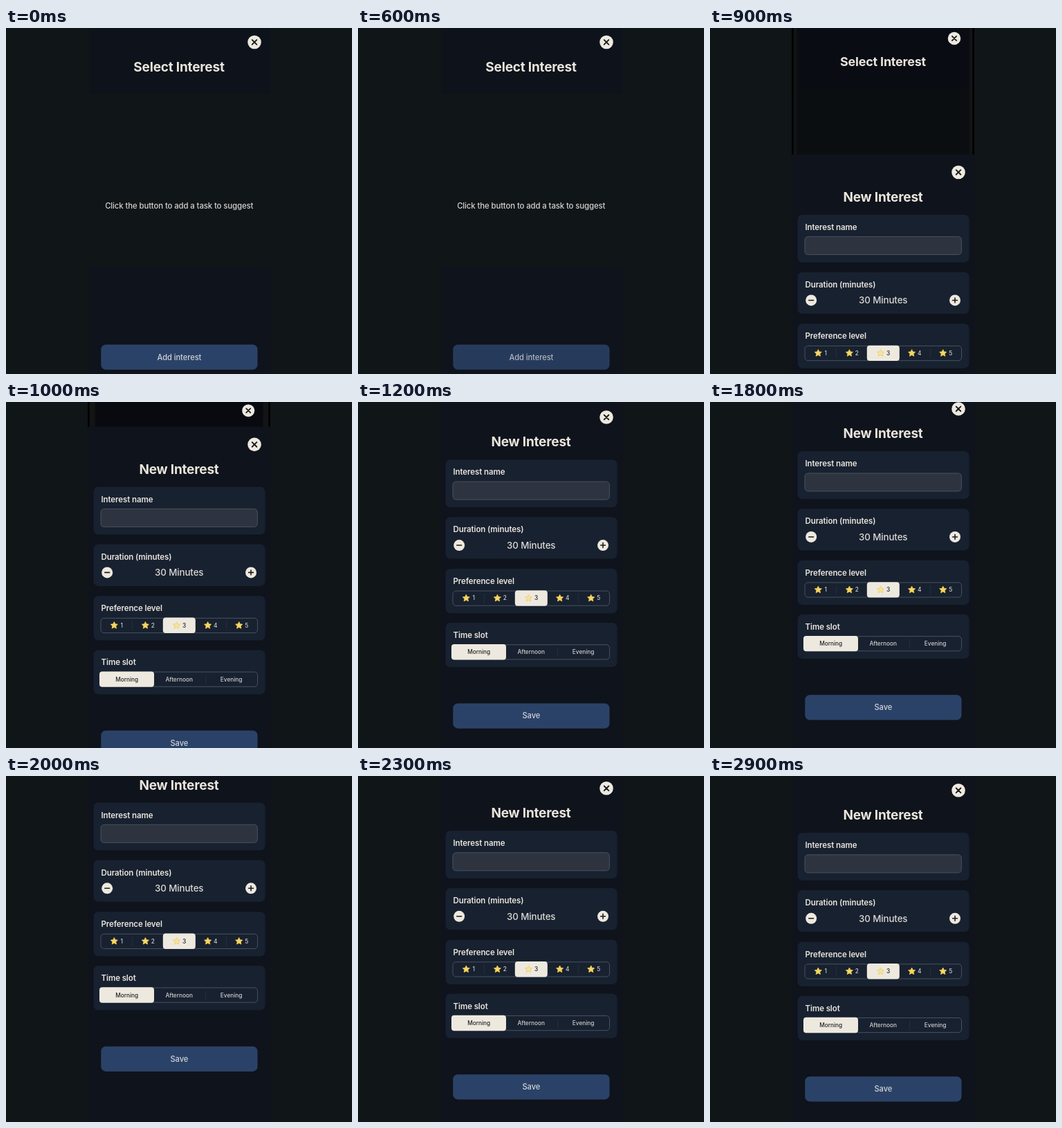
Write an HTML page that moves like this. It is 500x500 px and loops after 3100 ms.

```html
<!DOCTYPE html>
<html lang="en">
<head>
<meta charset="utf-8">
<title>New Interest</title>
<style>
  html, body { margin: 0; width: 100%; height: 100%; overflow: hidden; background: #101517; }
  svg { display: block; width: 100vw; height: 100vh; }
  text { font-family: Inter, Roboto, sans-serif; fill: #e9e5dc; }
  .title { font-size: 19px; font-weight: 700; letter-spacing: -.2px; }
  .label { font-size: 11.5px; font-weight: 600; letter-spacing: -.1px; }
  .hint { font-size: 11.4px; font-weight: 500; letter-spacing: -.12px; fill: #d3d2cf; }
  .value { font-size: 13.3px; font-weight: 500; letter-spacing: -.08px; fill: #dcdad5; }
  .button { font-size: 11.1px; font-weight: 500; letter-spacing: -.05px; fill: #d0d3d7; }
  .small { font-size: 8.3px; font-weight: 500; letter-spacing: -.03px; fill: #cfcfcd; }
  .dark { fill: #24262a; }
</style>
</head>
<body>
<svg id="stage" viewBox="0 0 500 500" xmlns="http://www.w3.org/2000/svg"></svg>
<script>
const LOOP = 3100, STEP = 100;
const CREAM = '#eee9df', INK = '#15191e', LINE = '#48515c', DIVIDER = '#27303c';

const rect = (x, y, w, h, fill, r = 0, extra = '') =>
  `<rect x="${x}" y="${y}" width="${w}" height="${h}" rx="${r}" fill="${fill}" ${extra}/>`;
const text = (x, y, cls, str, anchor = 'middle') =>
  `<text x="${x}" y="${y}" class="${cls}" text-anchor="${anchor}">${str}</text>`;
const path = (d, stroke, width) =>
  `<path d="${d}" fill="none" stroke="${stroke}" stroke-width="${width}" stroke-linecap="round"/>`;
const disc = (x, y, r, d, width) =>
  `<g transform="translate(${x} ${y})"><circle r="${r}" fill="${CREAM}"/>${path(d, INK, width)}</g>`;
const closeButton = y => disc(359, y, 9.8, 'M-3.3-3.3 3.3 3.3M3.3-3.3-3.3 3.3', 1.9);
const card = (y, h, label) =>
  rect(126.5, y, 248, h, '#182130', 7) + text(137.5, y + 22, 'label', label, 'start');
const outline = (x, y, w, h, fill = 'none') =>
  rect(x, y, w, h, fill, 4.5, `stroke="${LINE}" stroke-width="1"`);
const wideButton = (y, label) =>
  rect(137.3, y, 226.2, 36.2, '#2b4268', 7) + text(250.4, y + 22, 'button', label);

function star(x, y, fill, edge) {
  const points = Array.from({ length: 10 }, (_, i) => {
    const a = (i / 5 - 0.5) * Math.PI, r = i % 2 ? 2.6 : 5.3;
    return `${(x + r * Math.cos(a)).toFixed(2)},${(y + r * Math.sin(a)).toFixed(2)}`;
  });
  return `<polygon points="${points.join(' ')}" fill="${fill}" stroke="${edge}" stroke-width=".9" stroke-linejoin="round"/>`;
}

function levels() {
  let out = outline(137, 271.8, 226.5, 21.2) +
    path('M182.3 276V289M318.7 276V289', DIVIDER, 1) +
    rect(226.8, 271, 47, 22.4, CREAM, 4);
  for (let i = 0; i < 5; i++) {
    const x = 156.3 + i * 45.1, chosen = i === 2;
    out += (chosen ? star(x, 282.3, '#f6e3a0', '#eed06c') : star(x, 282.3, '#f5d766', '#efc848')) +
      text(x + 11, 285.2, chosen ? 'small dark' : 'small', i + 1);
  }
  return out;
}

const slots = () =>
  outline(136, 349.5, 227.5, 21.2) + path('M288.7 354V367', DIVIDER, 1) +
  rect(135, 348.8, 79, 22.4, CREAM, 4) +
  text(174.6, 363, 'small dark', 'Morning') +
  text(250.2, 363, 'small', 'Afternoon') +
  text(325.6, 363, 'small', 'Evening');

const home = `
  ${rect(118, 0, 264, 520, '#101518')}
  ${rect(120, 0, 262, 95, '#0e121b')}
  ${rect(120, 345, 262, 175, '#0f131b')}
  ${text(250.2, 261.4, 'hint', 'Click the button to add a task to suggest')}
  <g id="add">${wideButton(457.5, 'Add interest')}</g>
  ${rect(118, 0, 264, 520, '#000', 0, 'id="dim"')}
  ${closeButton(20.5)}
  ${text(250, 63, 'title', 'Select Interest')}`;

const form = `
  ${closeButton(20.8)}
  ${text(250, 63, 'title', 'New Interest')}
  ${card(82, 69, 'Interest name')}
  ${outline(137, 113.8, 226.3, 26, '#2e343f')}
  ${card(165, 60.3, 'Duration (minutes)')}
  ${disc(146.2, 205.8, 8, 'M-3.4 0H3.4', 1.6)}
  ${disc(354, 205.8, 8, 'M-3.4 0H3.4M0-3.4V3.4', 1.6)}
  ${text(250.2, 210.6, 'value', '30 Minutes')}
  ${card(239.7, 64.3, 'Preference level')}
  ${levels()}
  ${card(317.8, 64, 'Time slot')}
  ${slots()}
  ${wideButton(434.2, 'Save')}`;

const stage = document.getElementById('stage');
stage.innerHTML = `
  <clipPath id="screen">${rect(118, 0, 264, 500, '#000')}</clipPath>
  ${rect(0, 0, 500, 500, '#101517')}
  <g clip-path="url(#screen)">
    <g id="backdrop">${rect(118, 0, 264, 500, '#020304')}${rect(121, 0, 258, 500, '#121416')}</g>
    <g id="home">${home}</g>
    <g id="sheet">${rect(118, -5, 264, 520, '#0f131b')}<g id="form">${form}</g></g>
  </g>`;
const parts = Object.fromEntries(['backdrop', 'home', 'dim', 'add', 'sheet', 'form']
  .map(id => [id, document.getElementById(id)]));

// Critically damped spring: 1 at the start, settling to 0.
const settle = (ms, rate) => {
  const x = Math.max(0, ms) / 1000 * rate;
  return (1 + x) * Math.exp(-x);
};

// Pull upwards past the end of the form, then spring back.
function overscroll(t) {
  if (t < 1700) return 0;
  if (t < 2000) return -43.5 * Math.sin((t - 1700) / 300 * Math.PI / 2) ** 2;
  return -43.5 * settle(t - 2000, 14.5);
}

function draw(t) {
  const left = settle(t - 795, 20.3), shown = 1 - left;
  parts.backdrop.setAttribute('opacity', shown > 0 ? 1 : 0);
  parts.home.setAttribute('transform',
    `translate(250 ${-7 * shown}) scale(${1 - 0.088 * shown}) translate(-250 0)`);
  parts.dim.setAttribute('opacity', 0.5 * shown);
  parts.add.setAttribute('opacity', t >= 600 && t < 800 ? 0.85 : 1);
  parts.sheet.setAttribute('transform', `translate(0 ${505 * left})`);
  parts.form.setAttribute('transform', `translate(0 ${overscroll(t)})`);
}

const start = performance.now();
function tick() {
  const t = (performance.now() - start) % LOOP;
  draw(Math.floor(t / STEP) * STEP);
  requestAnimationFrame(tick);
}
tick();
</script>
</body>
</html>
```
